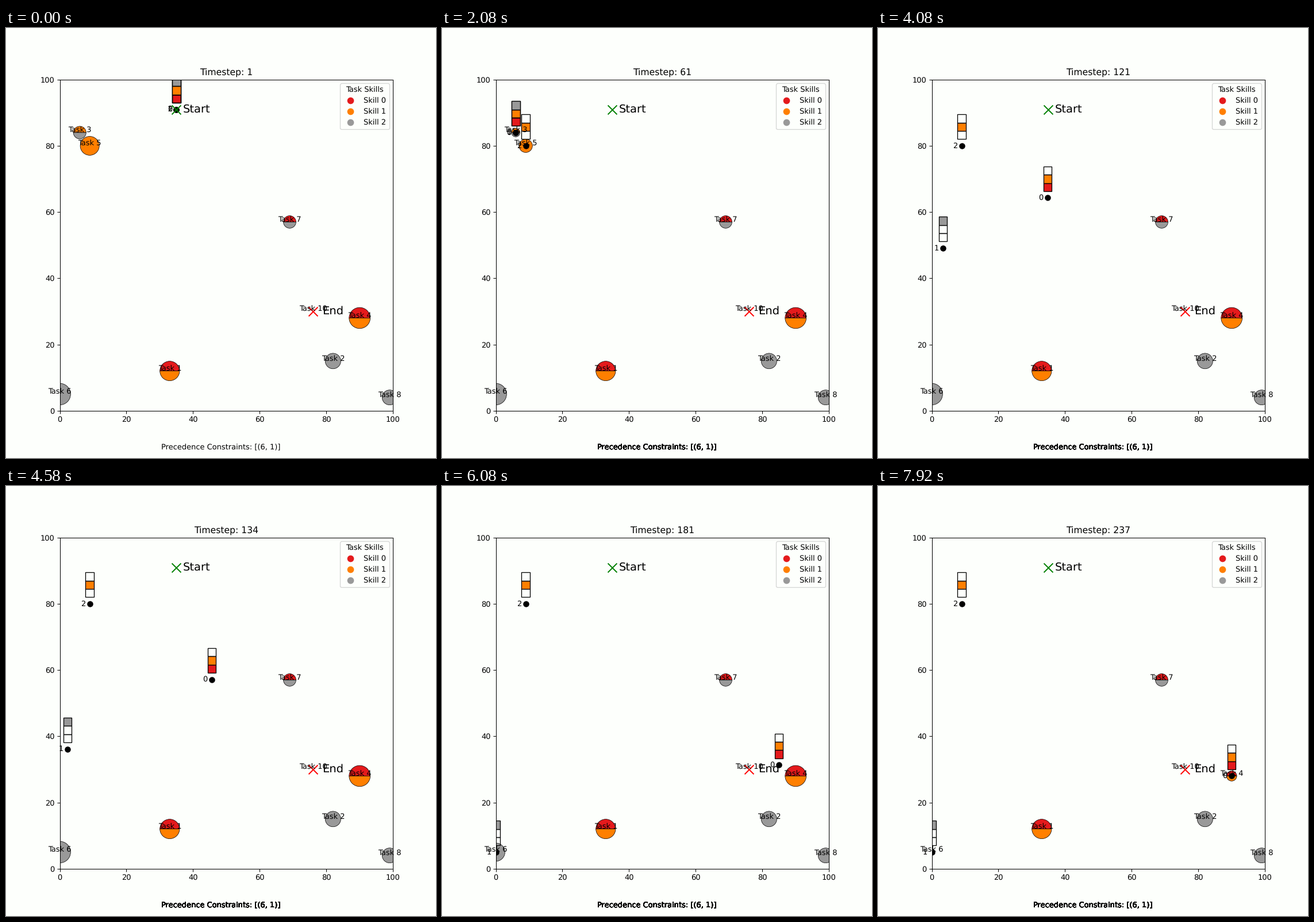
These frames come from a looping animation (748 px wide and 748 px high, 8 s). A matplotlib script:

```python
import numpy as np
import matplotlib.pyplot as plt
from matplotlib.animation import FuncAnimation
from matplotlib.lines import Line2D
from matplotlib.patches import Rectangle, Wedge

LOOP_MS, TICK_MS = 8000, 40
POSES = 96  # distinct pictures in one loop
PAPER = "#fdfffc"
SKILLS = ["#e41a1c", "#ff7f00", "#999999"]
START, END = (35, 91), (76, 30)
CELL = 2.5
NEVER = 10**6

# id: (x, y, radius, skills, work start, work end, label removed)
TASKS = {
    1: (33, 12, 2.95, (0, 1), NEVER, NEVER + 1, NEVER),
    2: (82, 15, 2.33, (2,), NEVER, NEVER + 1, NEVER),
    3: (6, 84, 1.9, (1, 2), 31, 86, 86),
    4: (90, 28, 3.17, (0, 1), 187, 252, NEVER),
    5: (9, 80, 2.85, (1,), 29, 92, 96),
    6: (0, 5, 3.25, (2,), 165, 222, NEVER),
    7: (69, 57, 1.88, (0, 2), NEVER, NEVER + 1, NEVER),
    8: (99, 4, 2.25, (2,), NEVER, NEVER + 1, NEVER),
}

# skills and (time, x, y) waypoints; robots travel one unit per timestep
ROBOTS = [
    ((0, 1), [(1, *START), (30.83, 6, 84), (86, 6, 84),
              (88, 7.2, 82.4), (187.07, 90, 28)]),
    ((2,), [(1, *START), (30.83, 6, 84), (86, 6, 84), (165.2, 0, 5)]),
    ((1,), [(1, *START), (29.23, 9, 80)]),
]

plt.rcParams.update({"font.family": "DejaVu Sans", "text.hinting": "none",
                     "figure.facecolor": PAPER, "axes.facecolor": PAPER})
fig, ax = plt.subplots(figsize=(8, 8), dpi=93.5)
ax.set(xlim=(0, 100), ylim=(0, 100))
title = ax.set_title("Timestep: 1")


class Task:
    def __init__(self, num, x, y, radius, skills, begin, finish, gone):
        self.radius, self.begin = radius, begin
        self.finish, self.gone = finish, gone
        span = 360 / len(skills)
        self.wedges = [
            ax.add_patch(Wedge((x, y), radius, i * span, (i + 1) * span,
                               fc=SKILLS[s], ec="black", lw=0.55))
            for i, s in enumerate(skills)]
        self.label = ax.text(x, y, f"Task {num}", ha="center")

    def update(self, t):
        left = (self.finish - t) / (self.finish - self.begin)
        left = min(max(left, 0), 1)
        for w in self.wedges:
            w.set_radius(self.radius * left ** 0.5)
            w.set_visible(left > 0)
        self.label.set_visible(t < self.gone)


class Robot:
    def __init__(self, num, skills, path):
        self.path = np.array(path, float).T
        self.cells = [
            ax.add_patch(Rectangle((0, 0), CELL, CELL, ec="black", lw=1,
                                   fc=SKILLS[i] if i in skills else "none",
                                   zorder=1.5))
            for i in range(3)]
        self.dot = ax.scatter([0], [0], s=50, c="black", zorder=1.9)
        self.label = ax.text(0, 0, str(num), ha="center", va="center")

    def update(self, t):
        times, xs, ys = self.path
        x, y = np.interp(t, times, xs), np.interp(t, times, ys)
        for i, cell in enumerate(self.cells):
            cell.set_xy((x - CELL / 2, y + 2 + i * CELL))
        self.dot.set_offsets([(x, y)])
        self.label.set_position((x - 2, y))


tasks = [Task(num, *spec) for num, spec in TASKS.items()]
robots = [Robot(num, *spec) for num, spec in enumerate(ROBOTS)]

for (x, y), color, name in [(START, "green", "Start"), (END, "red", "End")]:
    ax.scatter([x], [y], s=150, c=color, marker="x", zorder=2)
    ax.text(x + 6, y, name, fontsize=15, ha="center", va="center")
ax.text(*END, "Task 10", ha="center")

handles = [Line2D([], [], marker="o", color=PAPER, markerfacecolor=c,
                  markersize=10, label=f"Skill {i}")
           for i, c in enumerate(SKILLS)]
ax.legend(handles=handles, title="Task Skills", loc="upper right")

# the caption is stacked once per timestep, so it grows darker
captions = [fig.text(0.5, 0.02, "Precedence Constraints: [(6, 1)]", ha="center")
            for _ in range(24)]


def timestep(n):
    return max(min(n + 1, 2), int(2.51 * n - 1.3))


def draw(tick):
    # poses change on the nearest tick, a little before their exact time
    pose = int(tick * TICK_MS * POSES / LOOP_MS + 0.1)
    t = timestep(min(pose, POSES - 1))
    title.set_text(f"Timestep: {t}")
    for item in tasks + robots:
        item.update(t)
    for i, cap in enumerate(captions):
        cap.set_visible(i < t)
    return []


anim = FuncAnimation(fig, draw, frames=LOOP_MS // TICK_MS,
                     init_func=lambda: draw(0), interval=TICK_MS,
                     repeat=True, repeat_delay=0)
plt.show()
```
